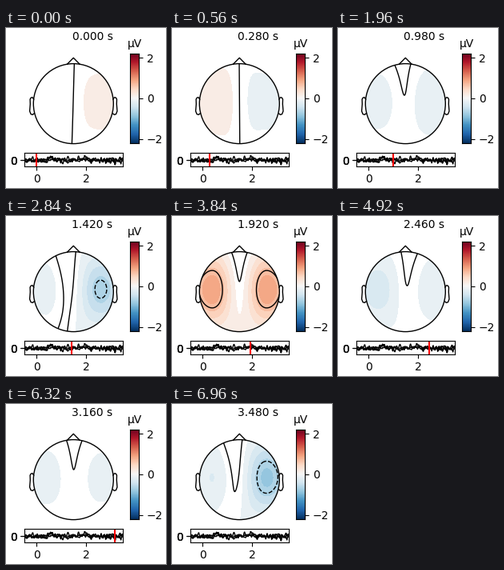
Animation, 200 px wide and 200 px high, one loop 7 s. Source, as a matplotlib script:

```python
import numpy as np
import matplotlib.pyplot as plt
from matplotlib.animation import FuncAnimation
from matplotlib.colors import ListedColormap
from matplotlib.patches import Circle

SIZE, FRAMES, STEP = 200, 175, 0.02
VMAX, BANDS = 2.21, 27
CX, CY, R = 84.3, 94.6, 50
MID_Y, GAP = 91.5, 34  # sensor row and sensor spacing
LEVELS = [-1.4, -0.63, 0, 0.65, 1.4]

# Resting potential at a few moments
KEYS = [0, .56, 1.42, 1.92, 2.46, 2.84, 3.48]
LEFT = [-.05, .15, -.15, .9, -.35, -.17, -.25]
RIGHT = [.17, .05, -.68, .9, -.2, -.075, -.8]

X, Y = np.meshgrid(np.linspace(CX - R, CX + R, 151),
                   np.linspace(CY - R, CY + R, 151))


def potentials(t):
    """Left and right values: drift, a wobble between keys, one sharp pulse."""
    phase = np.interp(t, KEYS, range(len(KEYS)))
    wobble = .3 * np.sin(np.pi * phase)
    left = np.interp(t, KEYS, LEFT) + wobble * np.sin(9 * t)
    right = np.interp(t, KEYS, RIGHT) + wobble * np.cos(11 * t)
    return left, right + 2 * np.exp(-((t - .56) / .13) ** 2)


def field(t):
    """Blend from the midline to a peak at each side sensor."""
    left, right = potentials(t)
    d = (X - CX) / GAP
    w = np.minimum(abs(d), 1)
    fade = np.exp(-((Y - MID_Y) / 41) ** 2)
    fade /= 1 + (np.maximum(abs(d) - 1, 0) * GAP / 27) ** 2
    side = np.where(d < 0, left, right) * fade
    mid = .045 * (left + right) * (Y - 82) / 40
    tilt = .75 * (right - left) * np.sign(d) * w * (1 - w) ** 2
    p = np.sin(np.pi / 2 * w) ** 1.8
    return mid * (1 - p) + side * p + tilt


def panel(x0, y0, x1, y1):
    """Axes placed by pixel edges, y counted from the top."""
    return fig.add_axes([x0 / SIZE, 1 - y1 / SIZE,
                         (x1 - x0) / SIZE, (y1 - y0) / SIZE])


def banded_cmap():
    colors = plt.get_cmap("RdBu_r")(np.linspace(0, 1, BANDS))
    colors[BANDS // 2] = 1
    return ListedColormap(colors)


plt.rcParams["font.family"] = "DejaVu Sans"
fig = plt.figure(figsize=(2, 2), dpi=100, facecolor="white")

# Head
ax = panel(0, 0, SIZE, SIZE)
ax.axis("off")
head = Circle((CX, CY), R, fc="none", ec="k", lw=1, zorder=4)
ax.add_patch(head)
image = ax.imshow(field(0), cmap=banded_cmap(), vmin=-VMAX, vmax=VMAX,
                  origin="lower", interpolation="bilinear", aspect="auto",
                  extent=(CX - R, CX + R, CY - R, CY + R))
ax.set(xlim=(0, SIZE), ylim=(SIZE, 0))
image.set_clip_path(head)

ear_x = np.array([49.7, 51, 51.8, 53, 54.2, 54, 54.7, 53.2, 51, 48.9])
ear_y = CY - np.array([5.5, 7.7, 7.8, 7.5, 5.5, -.5, -9.3, -13.1, -13.8, -12])
for sign in (-1, 1):
    ax.plot(CX + sign * ear_x, ear_y, "k", lw=1)
ax.plot([CX - 7.8, CX, CX + 7.8], [45.2, 37.3, 45.2], "k", lw=1)
label = ax.text(108, 15.2, "", ha="center", va="baseline", fontsize=10)

# Colour scale
bar = panel(155.1, 32, 166.3, 144)
bar.imshow(np.linspace(-VMAX, VMAX, 256)[:, None], cmap="RdBu_r",
           origin="lower", extent=(0, 1, -VMAX, VMAX), aspect="auto")
bar.set_xticks([])
bar.set_yticks([-2, 0, 2], ["−2", "0", "2"])
bar.yaxis.tick_right()
bar.set_title("µV", fontsize=10)

# Signal strip
strip = panel(23.1, 156.1, 146.1, 172.6)
strip.set(xlim=(-.5, 3.5), ylim=(-7, 9))
strip.set_xticks([0, 2])
strip.set_yticks([-.01, 0, .01], ["0"] * 3)
rng = np.random.default_rng(4)
times = np.linspace(-.5, 3.5, 201)
for peak in (.8, 2, 4.5):
    noise = np.convolve(rng.normal(size=203), [.3, .5, .3], "valid")
    bump = peak * np.exp(-((times - .55) / .1) ** 2)
    hump = 1.5 * np.exp(-((times - 1.95) / .2) ** 2)
    strip.plot(times, 2.4 * noise + bump + hump, "k", lw=1)
cursor = strip.axvline(0, color="r", lw=1.5, zorder=2.3)

lines = None


def draw(i):
    global lines
    if lines is not None:
        lines.remove()
    t = i * STEP
    z = field(t)
    image.set_data(z)
    lines = ax.contour(X, Y, z, levels=LEVELS, colors="k", linewidths=1)
    lines.set_clip_path(head)
    label.set_text(f"{t:.3f} s")
    cursor.set_xdata([t, t])
    cursor.set_visible(i < FRAMES - 1)
    return image, label, cursor


anim = FuncAnimation(fig, draw, frames=FRAMES, init_func=lambda: (),
                     interval=40, repeat=True, repeat_delay=0, blit=False)
plt.show()
```
